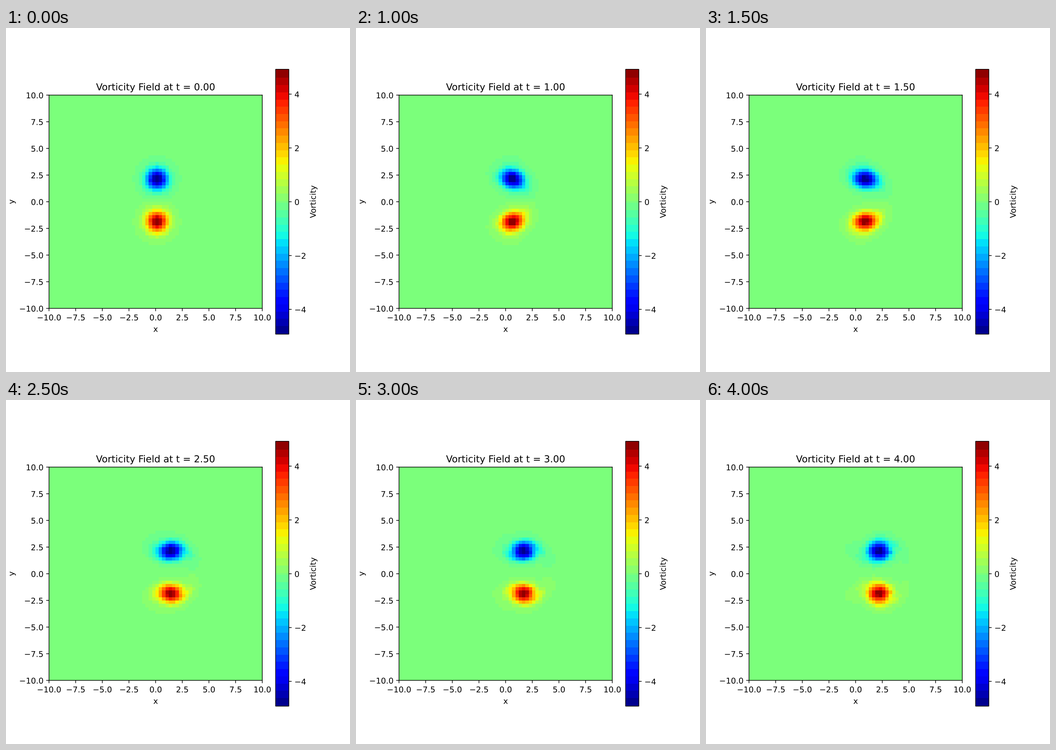
Recreate the animation shown at these times as a matplotlib script. Size 748 px wide and 748 px high, loop 4.5 s.

```python
import matplotlib.pyplot as plt
import numpy as np
from matplotlib.animation import FuncAnimation
from matplotlib.colors import ListedColormap
from matplotlib.patheffects import AbstractPathEffect

N, L = 64, 20.0
DX = L / N
NU = 0.001
DT = 0.025
FRAME_DT = 0.5
FRAMES = 9

axis = -L / 2 + DX * np.arange(N)
X, Y = np.meshgrid(axis, axis)

k = 2 * np.pi * np.fft.fftfreq(N, DX)
KX, KY = np.meshgrid(k, k)
K2 = KX**2 + KY**2
K2[0, 0] = 1.0


class Subpixel(AbstractPathEffect):
    """Draw lines, ticks and text at exact positions, not on whole pixels."""

    def draw_path(self, renderer, gc, path, affine, rgbFace=None):
        gc.set_snap(False)
        renderer.draw_path(gc, path, affine, rgbFace)


def diff(f, ax):
    return (np.roll(f, -1, ax) - np.roll(f, 1, ax)) / (2 * DX)


def laplacian(f):
    near = sum(np.roll(f, s, ax) for s in (-1, 1) for ax in (0, 1))
    return (near - 4 * f) / DX**2


def rate(w):
    """Advection by the stream-function flow plus weak viscosity."""
    w_hat = np.fft.fft2(w)
    w_hat[0, 0] = 0
    psi = np.real(np.fft.ifft2(-w_hat / K2))
    u, v = diff(psi, 0), -diff(psi, 1)
    return -u * diff(w, 1) - v * diff(w, 0) + NU * laplacian(w)


def step(w):
    a = rate(w)
    b = rate(w + DT / 2 * a)
    c = rate(w + DT / 2 * b)
    d = rate(w + DT * c)
    return w + DT / 6 * (a + 2 * b + 2 * c + d)


def simulate():
    w = 5 * (np.exp(-X**2 - (Y + 2)**2) - np.exp(-X**2 - (Y - 2)**2))
    fields = [w]
    for _ in range(FRAMES - 1):
        for _ in range(round(FRAME_DT / DT)):
            w = step(w)
        fields.append(w)
    return fields


def banded_jet(width=7, bands=18):
    """Jet in flat bands, with a narrow band of its own around zero."""
    base = plt.get_cmap("jet")(np.arange(256))
    i = np.arange(256)
    dist = np.where(i > 127, i - 128, 127 - i)
    band = np.where(dist == 0, 0, 1 + np.minimum((dist - 1) // width, bands - 1))
    band = np.where(i > 127, band, -band)
    colors = np.array([base[band == b].mean(axis=0) for b in band])
    return ListedColormap(colors)


fields = simulate()
peak = fields[0].max()

plt.rcParams["path.effects"] = [Subpixel()]
plt.rcParams["pcolormesh.snap"] = False

fig, ax = plt.subplots(figsize=(6, 6), dpi=748 / 6)
edges = np.linspace(-L / 2, L / 2, N + 1)
mesh = ax.pcolormesh(edges, edges, fields[0], cmap=banded_jet(),
                     vmin=-peak, vmax=peak)
ax.set_aspect("equal")
fig.colorbar(mesh, ax=ax, label="Vorticity")
ax.set_xlabel("x")
ax.set_ylabel("y")
title = ax.set_title("Vorticity Field at t = 0.00")


def update(i):
    mesh.set_array(fields[i])
    title.set_text(f"Vorticity Field at t = {i * FRAME_DT:.2f}")
    return mesh, title


anim = FuncAnimation(fig, update, frames=FRAMES, interval=500, repeat=True)
plt.show()
```
